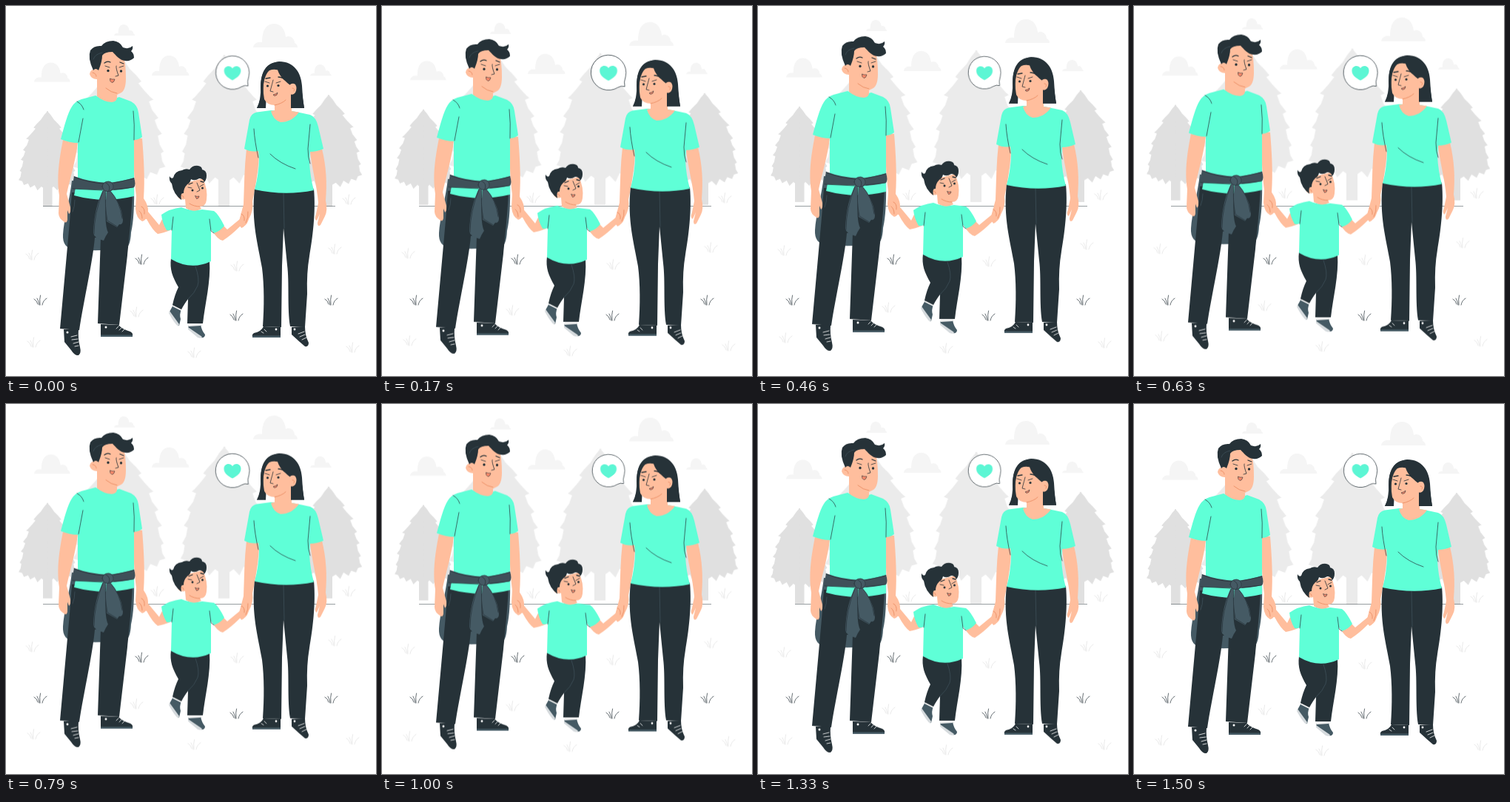
An HTML page that plays this animation: 500x500 px, repeating every 1540 ms.

```html
<!DOCTYPE html>
<html lang="en">
<head>
<meta charset="utf-8">
<title>Family walk</title>
<style>
html, body { margin: 0; width: 100%; height: 100%; overflow: hidden; background: #fff; }
svg { display: block; width: 100%; height: 100%; }
.float { animation: float 1540ms linear infinite; }
.beat { animation: beat 1540ms linear infinite; transform-origin: 306px 90px; }
/* 1500 ms cycles entered 42 ms in, with a short hold at the end */
@keyframes float {
  0%, 97.4%, 100% { transform: translateY(0); }
  46% { transform: translateY(-9.45px); }
  94.7% { transform: translateY(.55px); }
}
@keyframes beat {
  0%, 97.4%, 100% { transform: scale(1.028); }
  7%, 46% { transform: scale(1.1); }
  26.5%, 36.2%, 55.7%, 94.7% { transform: scale(1); }
}
.skin { fill: #ffbe9d; }
.shirt { fill: #5fffd7; }
.dark { fill: #263238; }
.coat { fill: #455a64; }
.band { fill: #3f5059; }
.line, .fold, .lace, .crease, .blush { fill: none; stroke-linecap: round; stroke-linejoin: round; }
.line, .fold { stroke: #263238; }
.line { stroke-width: .8; }
.fold { stroke-width: .7; }
.brow { stroke-width: 1.3; }
.lace { stroke: #fff; stroke-width: .8; }
.crease { stroke: #455a64; stroke-width: .6; }
.blush { stroke: #eb8f66; stroke-width: .9; }
.lip { fill: #ff8b6b; stroke: #263238; stroke-width: .6; }
</style>
</head>
<body>
<svg viewBox="0 0 500 500">
<defs>
  <path id="cloud" d="M0 32C1 26 6 24 12 25C12 8 18 0 28 0C38 0 43 8 44 18C50 15 56 20 56 26C59 27 60 30 60 32Z"/>
  <path id="half" d="M-2 0H0L12 14 24 32 38 46 50 60 43 64 56 80 70 95 77 101 67 105 74 124 88 142 80 147 86 164 96 178 87 182 91 202 100 218 94 222 97 240 104 252 91 256 85 270 70 264 62 280 46 270 36 290 22 276 10 284 -2 278Z"/>
  <g id="tree"><use href="#half"/><use href="#half" transform="scale(-1 1)"/></g>
  <path id="grass" fill="none" stroke-linecap="round" d="M-3 -1Q-4 -6 -8 -8M-1 0Q-2 -6 -4 -9M0 0Q-1 -8 .5 -13M3 0Q4 -6 9 -9"/>
</defs>

<g class="float">
  <g id="clouds" fill="#f5f5f5"></g>
  <g fill="#ebebeb">
    <use href="#tree" transform="translate(153 66) scale(.6)"/>
    <use href="#tree" transform="translate(295 66) scale(.57 .6)"/>
    <path d="M287 230H302V271H287ZM146 230H161V271H146Z"/>
  </g>
  <g fill="#e0e0e0">
    <use href="#tree" transform="translate(56 142) scale(.375 .37)"/>
    <use href="#tree" transform="translate(436 120) scale(.435 .43)"/>
    <path d="M50 240H62.500V271H50ZM431 235H441V271H431Z"/>
  </g>
  <g id="pale" stroke="#e0e0e0" stroke-width=".7"></g>
</g>

<path d="M50 270.300H445" stroke="#263238" stroke-width=".6"/>
<g id="tufts" stroke="#263238" stroke-width=".7"></g>

<g class="float">
  <g id="man">
    <path class="coat" d="M89 236C86 262 78 290 77 309Q76 327 92 329Q125 332 160 328Q168 327 169 306Q174 285 173 240Z"/>
    <path class="skin" d="M77 181L97 184C95 206 86 235 82 254L87 272Q88 279 85 281L83 276 83 289Q82 294 79 292Q71 287 71 280L72 256C68 233 72 206 77 181Z"/>
    <path class="skin" d="M172 179L184 179C186 204 188 234 186 260Q193 270 192 279Q190 290 184 291Q176 287 175 274L176 257C173 233 172 206 172 179Z"/>
    <path class="dark" d="M128 430L152 431Q157 437 168 440Q172 442 171 446L128 446Z"/>
    <path class="coat" d="M128 444.500L171 444.500V447H128Z"/>
    <path class="dark" d="M78 437L98 437Q97 449 100 461Q102 469 98 472Q93 473 88 465L79 454Z"/>
    <path class="lace" d="M149 436L152 433M153 438L156 435M157 440L160 437M88 447L96 445M89 451L97 450M91 456L98 454M93 460L98 459"/>
    <circle cx="135" cy="434" r="1.500" fill="#fff"/><circle cx="83" cy="441" r="1.500" fill="#fff"/>
    <path class="dark" d="M89 252L171 252C170 278 166 318 164 337L153 431L124 429L128 313L120 313C117 347 105 398 99 438L73 436L86 292Z"/>
    <path class="crease" d="M128 313L131 286M90 278Q93 271 93 262"/>
    <path class="shirt" d="M121 121Q137 130 153 123L169 129Q178 134 179 144L184 177Q179 181 173 181L173 257Q132 267 92 256L97 231 97 185Q86 185 74 180C79 162 83 145 89 136Q93 129 102 126Z"/>
    <path class="fold" d="M96 129Q103 133 105 140M104 152L98 184M172 142Q174 160 173 181"/>
    <path class="band" d="M92 230Q113 238 138 239Q158 237 173 232Q176 241 173 245Q155 249 140 249Q112 248 89 247Z"/>
    <path class="coat" d="M132 247Q119 272 118 307Q119 314 132 317Q135 310 138 306Q132 295 136 248ZM137 247Q148 254 156 277L158 289Q158 296 153 295L150 299L136 291Q134 271 135 249Z"/>
    <path class="fold" d="M92 231Q112 239 132 240M90 247L130 249M146 239L173 233M146 248L172 245M131 250Q119 280 119 308M135 252Q133 270 137 290L150 298M141 250Q154 264 157 287"/>
    <ellipse class="coat" cx="138" cy="244" rx="8" ry="7"/>
    <path class="fold" d="M130 244Q131 237 139 237Q146 239 145 246Q142 252 134 250Q131 248 130 244M135 239Q142 242 139 250"/>
    <path class="skin" d="M122 85L132 60H150L159 70Q162 78 162 98Q162 115 154 118L150 120V124Q150 129 143 130Q131 129 123 122V99Q115 99 113 92Q114 85 122 85Z"/>
    <path class="blush" d="M135 111Q142 117 150 118M117 90Q122 91 122 95"/>
    <path class="dark" d="M118 87Q110 70 114 60Q119 53 129 54Q134 47 145 47Q154 48 158 56Q166 59 171 54Q172 58 169 61Q173 64 173 70Q168 75 161 74C153 73 149 67 144 62Q133 62 130 67Q130 75 125 87Q121 83 118 87Z"/>
    <path class="crease" d="M118 72Q120 65 130 63"/>
    <path class="line brow" d="M133 77Q137 74 141 76M154 76L159 78"/>
    <path class="line" d="M134 81L140 83M153 83L159 81M149 81Q148 83 152 94L148 95"/>
    <circle class="dark" cx="138" cy="87.500" r="1.700"/><circle class="dark" cx="155.500" cy="88" r="1.700"/>
    <path class="lip" d="M140.500 98Q143 99.500 147 99Q146 103.500 143 103.500Q140 102 140.500 98Z"/>
  </g>

  <g id="woman">
    <path class="skin" d="M325 193L342 195C342 218 337 246 333 264Q335 276 328 288Q324 298 318 300Q313 294 317 283L321 268C322 243 322 218 325 193Z"/>
    <path class="skin" d="M411 195L427 193C433 218 434 240 432 263Q435 276 431 284L425 296Q421 299 421 293L424 281 420 290Q416 289 419 281L422 266C420 240 413 220 411 195Z"/>
    <path class="dark" d="M348 433L371 434V447L334 448Q331 445 335 442Q345 440 348 433ZM386 434L404 433Q404 445 409 455Q409 461 404 460L397 454 386 444Z"/>
    <path class="coat" d="M333 445.500H371V448H333Z"/>
    <path class="lace" d="M345 440L348 442M349 437L352 440M395 443L403 440M397 447L404 444M400 451L406 448"/>
    <circle cx="365" cy="437" r="1.400" fill="#fff"/><circle cx="390" cy="437" r="1.400" fill="#fff"/>
    <path class="dark" d="M336 247L416 247C419 279 414 315 410 338Q406 361 407 389L404 434L384 433C380 409 383 373 380 350L375 300L373 351L372 434L347 433C349 407 349 377 346 354C341 324 331 292 336 247Z"/>
    <path class="crease" d="M375 253L376 300"/>
    <path class="dark" d="M369 75C390 75 399 91 400 108Q401 126 403 138H385V116L352 117L351 138L339 138Q345 126 344 109C345 87 352 77 369 75Z"/>
    <path class="shirt" d="M358 141L387 142Q402 145 411 147Q419 150 422 163L429 193Q420 197 411 197L410 211Q411 231 416 249Q377 257 336 248Q342 225 342 206L341 196Q331 198 322 193L329 154Q331 145 339 143.500Z"/>
    <path class="fold" d="M335 166Q336 183 341 205M411 160L408 193Q408 205 411 213M357 200Q370 213 391 220"/>
    <path class="skin" d="M350 91Q362 80 379 92L384 107L386 121V142L396 143.500Q386 157 371 157Q361 154 358 142L363 141V134Q353 134 349 126Q346 111 350 91Z"/>
    <path class="blush" d="M363 134Q373 132 378 127"/>
    <path class="dark" d="M349 100Q354 82 367 83Q366 93 384 107L385 117V138H403Q399 113 399 103C395 81 378 74 365 76C347 79 343 99 345 111Q345 127 339 138H349L351 132 348 124Q346 113 349 100Z"/>
    <path class="skin" d="M383 107Q387 103 391 106Q394 111 391 117Q388 121 384 119Z"/>
    <path class="blush" d="M387 111Q391 111 389 115"/>
    <path class="line brow" d="M351 98L357 97M368 96Q373 96 376 99"/>
    <path class="line" d="M350 102L356 104M365 104L371 102M361 100Q360 104 357 115L361 116"/>
    <circle class="dark" cx="353.500" cy="108" r="1.600"/><circle class="dark" cx="368" cy="107.500" r="1.600"/>
    <path class="lip" d="M361 120Q365 119 367 117Q367 121 363 121.500Z"/>
  </g>

  <g id="boy">
    <path class="skin" d="M211 288L222 303Q212 307 205 308Q198 303 190 288L182 287Q176 280 180 270L184 266Q187 274 192 278L207 296Z"/>
    <path class="skin" d="M279 304L293 296L299 302 316 288Q318 277 325 276Q330 282 327 291Q324 299 316 298Q304 310 293 317Q286 316 279 304Z"/>
    <path class="blush" d="M183 271Q188 273 187 281M180 277Q184 280 184 287M318 281Q323 283 322 290M327 278Q328 286 324 293"/>
    <path class="coat" d="M226 404L237 410Q234 417 236 423L234 432Q230 431 221 413ZM247 431L263 430Q264 438 269 444Q269 449 263 448L246 436Z"/>
    <path d="M221 412L234 430L233 433Q228 430 220 415ZM246 434L265 447Q264 450 259 448L246 437Z" fill="#d5dadd"/>
    <path d="M227 402L239 408L237 412L225 406ZM247 428L265 428 263 432 247 433Z" fill="#f0f0f0"/>
    <path class="dark" d="M223 341L275 344C277 372 269 402 266 429L245 429L246 396Q242 401 237 410L225 404Q228 390 233 380C225 366 221 356 223 341Z"/>
    <path class="crease" d="M256 352Q262 369 259 378Q255 388 246 396"/>
    <path class="shirt" d="M237 272Q251 278 265 275L281 277Q287 281 295 297Q290 304 281 307L277 302V345Q250 358 223 342L224 302Q221 304 217 303Q211 293 210 282Q221 274 237 272Z"/>
    <path class="fold" d="M226 285L224 303M275 288L277 304 281 307"/>
    <path class="skin" d="M239 240L266 233Q273 248 271 262Q270 271 262 271L264 274Q254 280 243 273L242 261Q234 263 232 257Q233 251 239 253Z"/>
    <path class="blush" d="M248 267Q254 271 262 271M236 256Q240 256 240 259"/>
    <path class="dark" d="M237 262Q226 254 224 240Q220 236 221 230Q223 234 226 232Q228 223 238 222Q242 219 248 221Q252 215 260 216Q265 217 265 221Q271 222 271 229Q271 235 268 238Q266 233 261 233Q255 237 250 234Q249 239 245 241Q240 246 240 253Q235 252 237 262Z"/>
    <path class="line brow" d="M247 241L252 239M263 237L267 238"/>
    <path class="line" d="M246 245L251 246M262 244L267 241M258 239L262 249 258 251"/>
    <circle class="dark" cx="252" cy="249" r="1.500"/><circle class="dark" cx="265.500" cy="246" r="1.500"/>
    <path class="lip" d="M255.500 256.500Q258 258 261 257Q260.500 260.500 257.500 260.500Z"/>
  </g>
</g>

<g class="beat">
  <path d="M327.500 95A22 22 0 1 0 318 108.500Q322 106 326.500 107.500Q325 102 327.500 95Z" fill="#fff" stroke="#263238" stroke-width=".7"/>
  <path d="M306 100C300 97 295 93 295 87.500C295 81 303 79.500 306 84.500C309 79.500 317 81 317 87.500C317 93 312 97 306 100Z" fill="#5cf6d4"/>
</g>
</svg>
<script>
const NS = 'http://www.w3.org/2000/svg';

function place(parent, shape, spots) {
  for (const [x, y, s = 1] of spots) {
    const use = document.createElementNS(NS, 'use');
    use.setAttribute('href', '#' + shape);
    use.setAttribute('transform', `translate(${x} ${y}) scale(${s})`);
    document.getElementById(parent).append(use);
  }
}

place('clouds', 'cloud', [[334, 24], [146, 25, .47], [38, 76.5, .81], [197, 67, .84], [411, 79, .48]]);
place('pale', 'grass', [[35, 343], [176, 420], [254, 475], [37, 461], [312, 358], [444, 335], [463, 268], [468, 468], [204, 268]]);
place('tufts', 'grass', [[46, 404], [183, 349], [311, 425], [439, 404]]);
</script>
</body>
</html>
```
